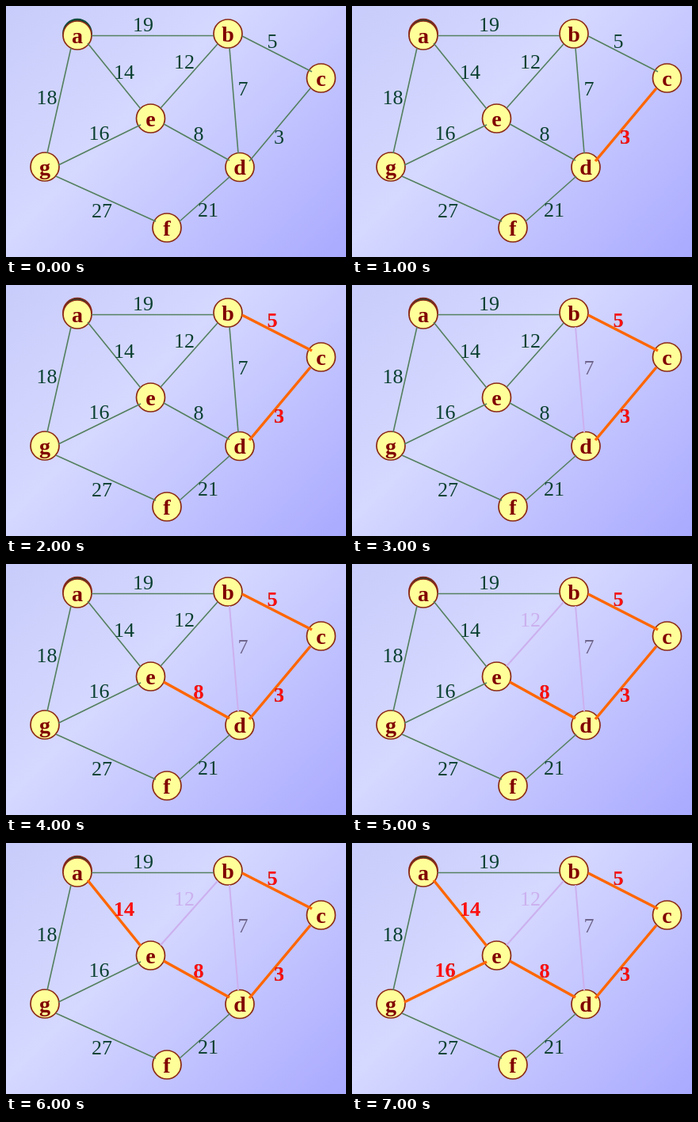
Write an HTML page with a canvas that moves like this. It is 429x317 px and loops after 8 s.

```html
<!DOCTYPE html>
<html>
<head>
<meta charset="utf-8">
<style>
  html, body { margin: 0; width: 429px; height: 317px; overflow: hidden; }
  canvas { display: block; }
</style>
</head>
<body>
<canvas id="stage" width="429" height="317"></canvas>
<script>
const ctx = document.getElementById('stage').getContext('2d');
const STEP = 1000, STEPS = 8;
const SERIF = '"Liberation Serif", "Times New Roman", serif';

const nodes = {
  a: [90, 37], b: [280, 35], c: [397.5, 91], d: [295, 203.5],
  e: [182.5, 142], f: [203, 280], g: [49, 203]
};

// ends of the line, weight, label position, step at which it is decided
const edges = [
  { line: [108, 37.5, 262, 37.5], weight: 19, at: [173, 32] },
  { line: [298, 38, 386, 83], weight: 5, at: [336, 53], step: 2 },
  { line: [384, 104, 307, 196], weight: 3, at: [344.5, 174], step: 1 },
  { line: [282, 53, 293, 186], weight: 7, at: [299, 113], step: 3, rejected: '#6c6288' },
  { line: [267, 48, 195, 129], weight: 12, at: [225, 79], step: 5, rejected: '#cbb0ee' },
  { line: [103, 47, 170, 130], weight: 14, at: [149, 92], step: 6 },
  { line: [199, 149, 282, 195], weight: 8, at: [243, 170], step: 4 },
  { line: [170, 150, 66, 201], weight: 16, at: [117.5, 169], step: 7 },
  { line: [82, 53, 52, 186], weight: 18, at: [51.5, 124], },
  { line: [63, 215, 189, 272], weight: 27, at: [121, 267] },
  { line: [219, 272, 283, 215], weight: 21, at: [255, 266] }
];

function background() {
  const fill = ctx.createLinearGradient(0, 0, 373, 373);
  fill.addColorStop(0, '#c8ccfa');
  fill.addColorStop(0.4, '#d5d8ff');
  fill.addColorStop(1, '#a9a9ff');
  ctx.fillStyle = fill;
  ctx.fillRect(0, 0, 429, 317);
}

function disc(x, y, fill, stroke) {
  ctx.beginPath();
  ctx.arc(x, y, 18, 0, Math.PI * 2);
  ctx.fillStyle = fill;
  ctx.fill();
  ctx.strokeStyle = stroke;
  ctx.lineWidth = 1.7;
  ctx.stroke();
}

function text(value, x, y, color, size, bold) {
  ctx.font = `${bold ? 'bold ' : ''}${size}px ${SERIF}`;
  ctx.fillStyle = color;
  ctx.fillText(value, x, y);
}

function segment([x1, y1, x2, y2], color, width) {
  ctx.beginPath();
  ctx.moveTo(x1, y1);
  ctx.lineTo(x2, y2);
  ctx.strokeStyle = color;
  ctx.lineWidth = width;
  ctx.stroke();
}

function drawEdge({ line, weight, at, step, rejected }, current) {
  const [x, y] = at;
  const decided = step !== undefined && current >= step;
  if (decided && rejected) {
    segment(line, '#ccb0ee', 2);
    text(weight, x, y, rejected, 26);
  } else if (decided) {
    segment(line, '#ff6600', 3.5);
    text(weight, x, y, '#0a4030', 26);
    text(weight, x, y, '#ff1010', 26, true);
  } else {
    segment(line, '#54805f', 1.6);
    text(weight, x, y, '#0a4030', 26);
  }
}

function draw(current) {
  background();
  ctx.textAlign = 'center';
  disc(90, 34.5, '#0d4a3c', current ? '#8a2418' : '#0d4a3c');
  for (const [name, [x, y]] of Object.entries(nodes)) {
    disc(x, y, '#ffff99', '#8c2a14');
    text(name, x, y + 9.5, '#800000', 28, true);
  }
  for (const edge of edges) drawEdge(edge, current);
}

const start = performance.now();
function frame() {
  const elapsed = performance.now() - start;
  draw(Math.floor(elapsed / STEP) % STEPS);
  requestAnimationFrame(frame);
}
frame();
</script>
</body>
</html>
```
